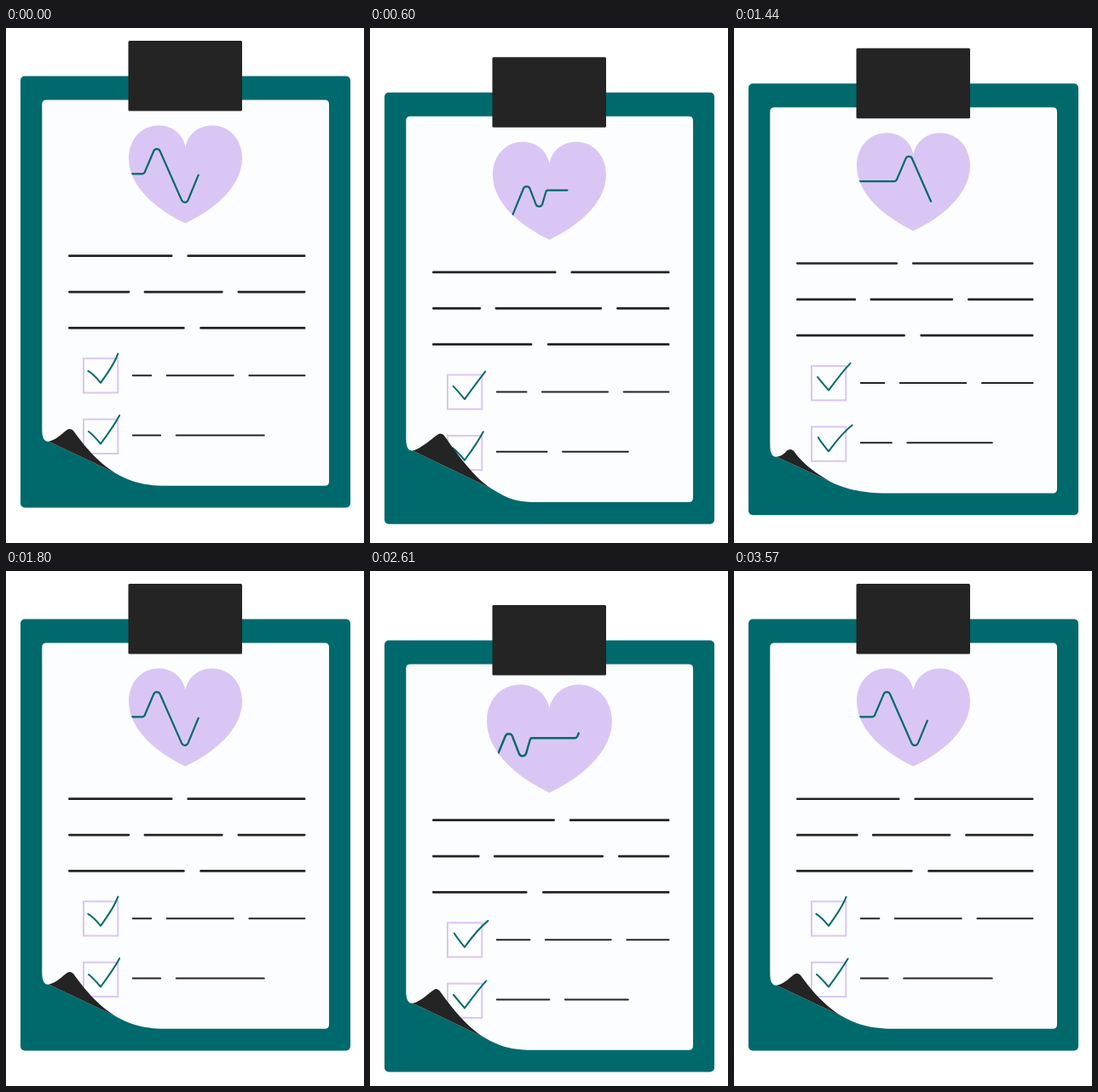
An HTML page that plays this animation: 420x605 px, repeating every 3600 ms.

```html
<!DOCTYPE html>
<html lang="en">
<head>
<meta charset="utf-8">
<title>Health checklist</title>
<style>
  html, body { margin: 0; width: 100%; height: 100%; overflow: hidden; background: #fff; }
  svg { display: block; width: 420px; height: 605px; }
  .line { fill: none; stroke-linecap: round; stroke-linejoin: round; }
  .ink { stroke: #252326; }
  .teal { stroke: #00696c; stroke-width: 2.2; }
  .box { fill: none; stroke: #dac6f4; stroke-width: 2; }
</style>
</head>
<body>
<svg viewBox="0 0 420 605">
  <defs>
    <path id="heart" d="M210.5 139.5C207 124 195 114.5 179 114.5C158 114.5 144 132 144 153C144 187 178 214 210.5 229.5C243 214 277 187 277 153C277 132 263 114.5 242 114.5C226 114.5 214 124 210.5 139.5Z"/>
    <clipPath id="heartClip"><use href="#heart"/></clipPath>
    <clipPath id="paperClip"><path id="paperMask"/></clipPath>
  </defs>
  <g id="board">
    <rect x="17" y="56.5" width="387" height="507" rx="5" fill="#00696c"/>
    <path id="paper" fill="#fcfdff"/>
    <g clip-path="url(#paperClip)">
      <g id="pulse">
        <use href="#heart" fill="#dac6f4"/>
        <g clip-path="url(#heartClip)"><path id="wave" class="line teal"/></g>
      </g>
      <g id="rows"></g>
      <rect class="box" x="91" y="388.2" width="40.3" height="40.3"/>
      <rect class="box" x="91" y="459.7" width="40.3" height="40.3"/>
      <path id="check1" class="line teal" style="stroke-width:2"/>
      <path id="check2" class="line teal" style="stroke-width:2" transform="translate(0 71.7)"/>
    </g>
    <path id="flap" fill="#242424"/>
    <rect x="143.5" y="15" width="133.5" height="82.5" rx="1.5" fill="#242424"/>
  </g>
</svg>
<script>
const $ = id => document.getElementById(id);
const CYCLE = 1800, STEP = 141, TAU = Math.PI * 2;
const set = (el, name, value) => el.setAttribute(name, value);

// Polyline with circular corners; each point is [x, y, radius].
function roundedPath(points) {
  let d = `M${points[0][0]} ${points[0][1]}`;
  for (let i = 1; i < points.length - 1; i++) {
    const [x, y, r] = points[i];
    const toward = ([px, py]) => {
      const len = Math.hypot(px - x, py - y);
      return [(px - x) / len, (py - y) / len];
    };
    const a = toward(points[i - 1]), b = toward(points[i + 1]);
    const half = Math.acos(a[0] * b[0] + a[1] * b[1]) / 2;
    const cut = r / Math.tan(half);
    const sweep = a[0] * b[1] - a[1] * b[0] < 0 ? 1 : 0;
    d += `L${x + a[0] * cut} ${y + a[1] * cut}` +
         `A${r} ${r} 0 0 ${sweep} ${x + b[0] * cut} ${y + b[1] * cut}`;
  }
  const end = points[points.length - 1];
  return d + `L${end[0]} ${end[1]}`;
}

// Heartbeat trace: two beats, x measured from the first tall peak.
const BASE = 171.3;
const beat = [[-15, BASE, 3], [0, 136, 4], [33, 211, 4], [54, 160, 4], [69, 199, 4], [77, BASE, 2]];
const shifted = n => beat.map(([x, y, r]) => [x + n * STEP, y, r]);
const wave = $('wave');
set(wave, 'd', roundedPath([[-64, BASE], ...shifted(0), ...shifted(1), [267, BASE]]));

function lengthAt(x) {
  let lo = 0, hi = wave.getTotalLength();
  for (let i = 0; i < 30; i++) {
    const mid = (lo + hi) / 2;
    if (wave.getPointAtLength(mid).x < x) lo = mid; else hi = mid;
  }
  return lo;
}
const trimStart = lengthAt(48.5), trimEnd = lengthAt(48.5 + STEP);

// Each row: y, stroke width, left, right, gaps as [centre, swing, phase, width].
const rows = [
  [267.7, 2.7, 73, 351.5, [[213.3, -14, 48, 16.8]]],
  [310.1, 2.7, 73, 351.5, [[145.5, 8.7, 24, 16.2], [272.4, -10.2, 24, 16.8]]],
  [352.4, 2.7, 73, 351.5, [[205.6, 12.9, 0, 17.4]]],
  [408.2, 2, 147.8, 351.5, [[188.3, -8.8, 0, 16.4], [284.2, -8.2, 0, 16.6]]],
  [478.5, 2, 147.8, 303.8, [[204.4, -15.3, 24, 16.5]]]
].map(([y, width, left, right, gaps]) => {
  const el = document.createElementNS('http://www.w3.org/2000/svg', 'path');
  set(el, 'class', 'line ink');
  set(el, 'stroke-width', width);
  $('rows').append(el);
  return { el, y, width, left, right, gaps };
});

function drawRow({ el, y, width, left, right, gaps }, swing) {
  const cap = width / 2;
  let d = `M${left + cap} ${y}`;
  for (const [centre, amount, phase, gap] of gaps) {
    const x = centre + amount * swing(phase);
    d += `H${x - gap / 2 - cap}M${x + gap / 2 + cap} ${y}`;
  }
  set(el, 'd', d + `H${right - cap}`);
}

function drawCheck(el, s) {
  set(el, 'd', `M${97.7 + 1.7 * s} ${401.6 - 1.6 * s}Q102 406 111 416.8` +
    `Q127 395 ${135.4 + 4.8 * s} ${384.5 + 2.2 * s}`);
}

function drawFold(k) {
  const nx = 50, ny = 485.7 - 9.8 * k;
  const tx = 75.2 + 9.2 * k, ty = 470.8 - 16 * k;
  const ex = 128 + 17 * k, ey = 522.7 - 0.8 * k;
  const fx = 188 + 9 * k, bottom = 537.8;
  const sheet = `M42.3 89.5Q42.3 84.5 47.3 84.5H374Q379 84.5 379 89.5V532.8Q379 ${bottom} 374 ${bottom}H${fx}` +
    `C${fx - 30} ${bottom} ${ex + 14} ${ey + 8} ${ex} ${ey}L${nx} ${ny}` +
    `C45 ${ny + 0.5} 42.3 ${ny - 4} 42.3 ${ny - 14}Z`;
  set($('paper'), 'd', sheet);
  set($('paperMask'), 'd', sheet);
  set($('flap'), 'd', `M${nx} ${ny}C${nx + 10} ${ny - 2} ${tx - 7} ${ty + 3} ${tx - 3} ${ty + 1}` +
    `Q${tx} ${ty - 1} ${tx + 3.5} ${ty + 2}` +
    `C${tx + 13} ${ty + 15} ${ex - 23} ${ey - 14} ${ex} ${ey}Z`);
}

function draw(time) {
  const u = time % CYCLE / CYCLE;
  const swing = degrees => Math.cos(TAU * (u + degrees / 360));

  set($('board'), 'transform', `translate(0 ${12.8 * (1 - swing(0))})`);
  drawFold(Math.sin(TAU * u));
  rows.forEach(row => drawRow(row, swing));
  drawCheck($('check1'), -swing(-32));
  drawCheck($('check2'), -swing(-62));

  const p = Math.min(1, Math.max(0, u * 3 - 1));
  const scale = 1 + 0.13 * Math.sin(Math.PI * p) ** 2;
  set($('pulse'), 'transform', `translate(210.5 172.5) scale(${scale}) translate(-210.5 -172.5)`);
  set(wave, 'transform', `translate(${177 - STEP * u} 0)`);
  set(wave, 'stroke-dasharray', `${trimStart + (trimEnd - trimStart) * u} 2000`);
}

function tick() {
  draw(performance.now());
  requestAnimationFrame(tick);
}
tick();
</script>
</body>
</html>
```
